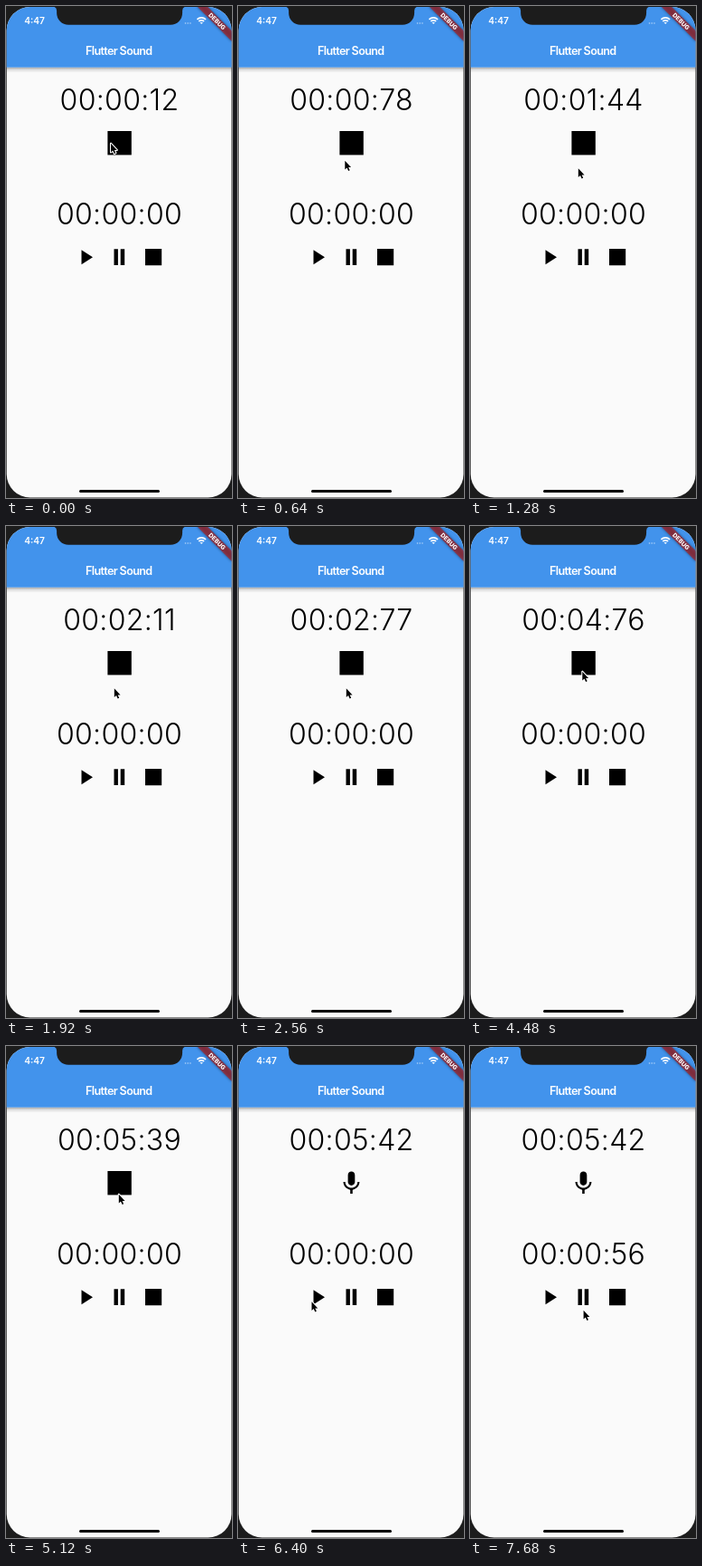
Write an HTML page that moves like this. It is 250x543 px and loops after 8000 ms.

```html
<!DOCTYPE html>
<html lang="en">
<head>
<meta charset="utf-8">
<title>Sound recorder</title>
<style>
  html, body { margin: 0; width: 100%; height: 100%; overflow: hidden; background: #1c1c1c; }
  svg { display: block; width: 250px; height: 543px; }
  text { font-family: Inter, Roboto, "Liberation Sans", sans-serif; text-anchor: middle; font-optical-sizing: none; }
  .timer { font-size: 32px; font-weight: 300; letter-spacing: .3px; }
  .bar { fill: #fff; }
</style>
</head>
<body>
<svg viewBox="0 0 250 543">
  <defs>
    <clipPath id="screen"><rect x=".7" y="1" width="248.8" height="541.6" rx="26"/></clipPath>
    <linearGradient id="shade" x2="0" y2="1">
      <stop offset="0" stop-color="#000" stop-opacity=".34"/>
      <stop offset=".4" stop-color="#000" stop-opacity=".12"/>
      <stop offset="1" stop-color="#000" stop-opacity="0"/>
    </linearGradient>
    <filter id="blur" x="-20%" y="-60%" width="140%" height="220%"><feGaussianBlur stdDeviation="1.8"/></filter>
  </defs>
  <rect width="250" height="543" fill="#1c1c1c"/>
  <g clip-path="url(#screen)">
    <rect width="250" height="543" fill="#fafafa"/>
    <rect y="67.7" width="250" height="6" fill="url(#shade)"/>
    <rect width="250" height="67.7" fill="#4293ec"/>
    <text class="bar" x="124.8" y="53.5" font-size="12.6" font-weight="600" letter-spacing="-.65">Flutter Sound</text>
    <text class="bar" x="31.5" y="20" font-size="10.2" font-weight="600">4:47</text>
    <g class="bar" fill-opacity=".6">
      <circle cx="198.5" cy="19" r=".8"/><circle cx="201.2" cy="19" r=".8"/><circle cx="203.9" cy="19" r=".8"/>
    </g>
    <g fill="none" stroke="#fff" stroke-width="1.7">
      <path d="M211.4 14.8a6.8 6.8 0 0 1 9.6 0M213.3 17a4.1 4.1 0 0 1 5.8 0"/>
      <path d="M214.5 18.1h3.4l-1.7 1.9z" fill="#fff" stroke="none"/>
    </g>
    <g transform="translate(249.5 1) rotate(45)">
      <rect x="-27" y="18.6" width="54" height="8" opacity=".5" filter="url(#blur)"/>
      <rect x="-27" y="18.6" width="54" height="8" fill="#b71c1c" fill-opacity=".63"/>
      <text class="bar" y="25" font-size="6.7" font-weight="800">DEBUG</text>
    </g>
    <path transform="translate(.6 .7)" d="M51 0q4.5 0 4.5 4.5V7a13 13 0 0 0 13 13h113a13 13 0 0 0 13-13V4.5q0-4.5 4.5-4.5z" fill="#1c1c1c"/>
    <rect x="81" y="533.9" width="89" height="3" rx="1.5"/>
  </g>

  <text class="timer" id="recorded" x="125.5" y="115"/>
  <text class="timer" id="played" x="125.5" y="241"/>
  <rect id="stopRecording" x="112.4" y="138" width="26.4" height="26.4"/>
  <path id="mic" transform="translate(110.1 136) scale(1.28)" d="M12 14c1.66 0 3-1.34 3-3V5c0-1.66-1.34-3-3-3S9 3.34 9 5v6c0 1.66 1.34 3 3 3zm5.3-3c0 3-2.54 5.1-5.3 5.1S6.7 14 6.7 11H5c0 3.41 2.72 6.23 6 6.72V21h2v-3.28c3.28-.48 6-3.3 6-6.72z"/>
  <path d="M83.5 269.2v16L96 277.2zM119.5 268.3h4.4v17.8h-4.4zM126.7 268.3h4.5v17.8h-4.5zM154 268.1h18.2v18.2H154z"/>
  <path id="cursor" d="M.3.7v9.8l2.2-2 1.6 3.5 1.6-.7-1.6-3.4h3z" stroke="#fff" stroke-width="2.1" stroke-linejoin="round" paint-order="stroke"/>
</svg>
<script>
  const LOOP = 8000, STEP = 320;
  const RECORD_END = 5440;

  // [time in ms, hundredths of a second]
  const recordedKeys = [[0, 12], [1280, 144], [2560, 277], [3840, 412], [5120, 539], [5440, 542]];
  const playedKeys = [[7040, 0], [7360, 23], [7680, 56]];
  // [time in ms, x, y]
  const cursorKeys = [
    [0, 115.7, 151], [320, 116.5, 157], [640, 118, 170], [960, 119.5, 178.5],
    [4160, 123, 158], [4480, 124, 160], [4800, 124.5, 163],
    [5440, 106, 258], [5760, 89.5, 283], [6400, 81.2, 281.5],
    [7360, 114, 296], [7680, 125.3, 291]
  ];

  const $ = id => document.getElementById(id);
  const show = (id, on) => $(id).setAttribute("visibility", on ? "visible" : "hidden");
  const pad = n => String(n).padStart(2, "0");
  const clock = n => [Math.floor(n / 6000), Math.floor(n / 100) % 60, n % 100].map(pad).join(":");

  function interpolate(keys, t) {
    const next = keys.findIndex(key => key[0] > t);
    if (next === 0) return keys[0][1];
    if (next < 0) return keys[keys.length - 1][1];
    const [t0, a] = keys[next - 1], [t1, b] = keys[next];
    return Math.round(a + (b - a) * (t - t0) / (t1 - t0));
  }

  function draw(now) {
    const t = Math.floor(now % LOOP / STEP) * STEP;
    const [, x, y] = cursorKeys.filter(key => key[0] <= t).pop();
    $("recorded").textContent = clock(interpolate(recordedKeys, t));
    $("played").textContent = clock(interpolate(playedKeys, t));
    $("cursor").setAttribute("transform", `translate(${x} ${y})`);
    show("stopRecording", t < RECORD_END);
    show("mic", t >= RECORD_END);
  }

  const start = performance.now();
  function tick() {
    draw(performance.now() - start);
    requestAnimationFrame(tick);
  }
  tick();
</script>
</body>
</html>
```
